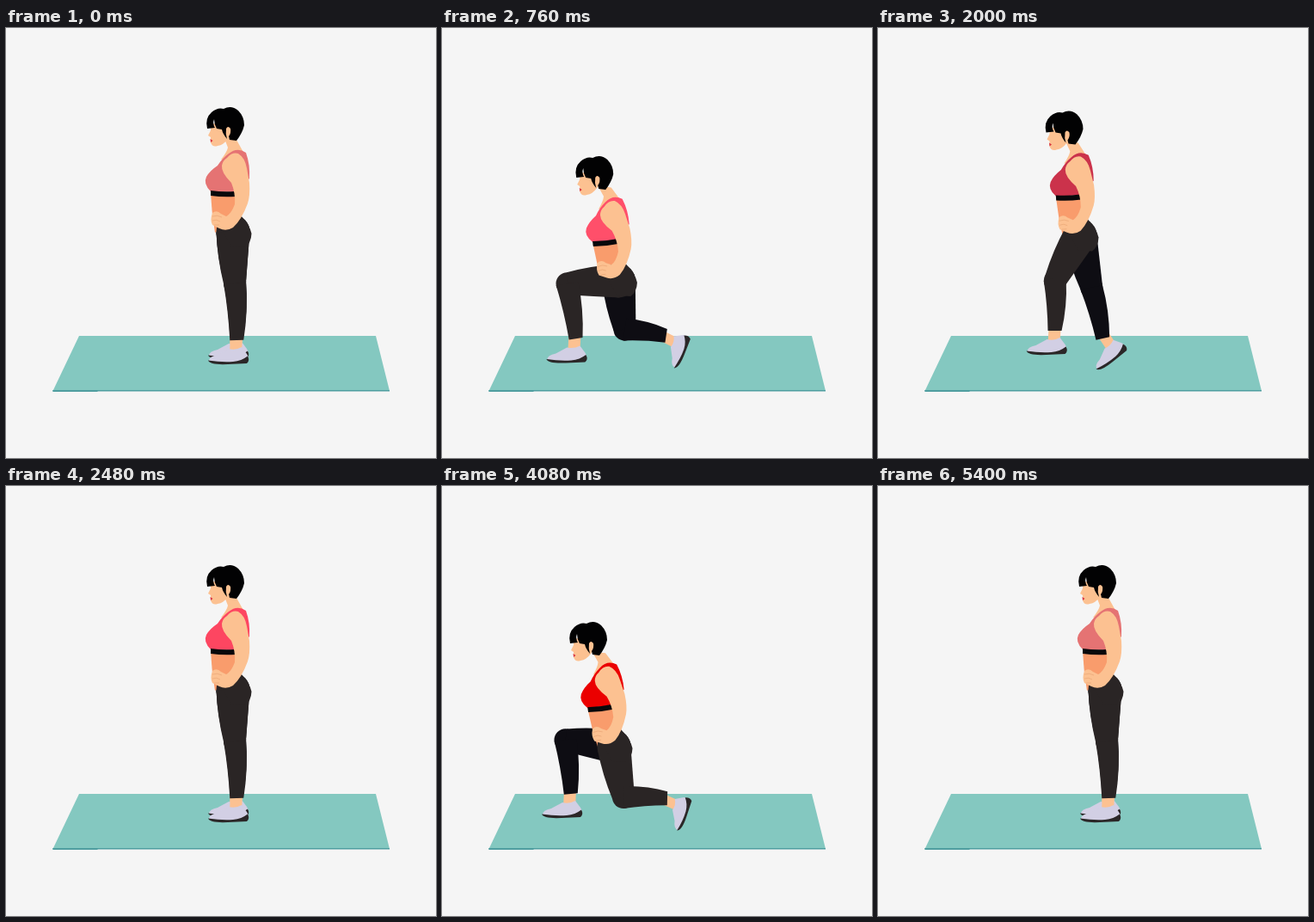
Recreate the animation shown at these times as an HTML page with a canvas. Size 500x500 px, loop 6.04 s.

```html
<!DOCTYPE html>
<html lang="en">
<head>
<meta charset="utf-8">
<title>Lunges</title>
<style>
html, body { margin: 0; width: 100%; height: 100%; overflow: hidden; background: #f5f5f5; }
canvas { display: block; width: 100vmin; height: 100vmin; }
</style>
</head>
<body>
<canvas id="stage" width="500" height="500"></canvas>
<script>
const ctx = document.getElementById('stage').getContext('2d');
const LOOP = 6040, SECOND_LUNGE = 2940;
const SKIN = '#fcc191', BELLY = '#f99c6c', NEAR = '#2a2525', FAR = '#0e0d13';

const shapes = {
  mat: 'M85 358H430L446 422H54.500Z',
  belly: 'M238 192L267 193L270 220L243 238Q239 215 238 192Z',
  neck: 'M253 126L258 139Q257 144 250 153L278 148L268 130Z',
  bra: 'M259 146Q269 138 279 145Q284 159 283 175L268 191L238 190Q229 181 233 173Q237 166 246 160Q251 152 259 146Z',
  band: 'M238 189Q252 191 266 190L267 196Q252 197 238 195Z',
  pelvis: 'M272 217Q283 228 285.500 239Q285 250 278 255L262 254L252 236Z',
  arm: 'M257 151Q263 144 270 146Q278 151 280 163L283 180Q284 195 281 204Q274 223 264 232Q256 237 248 233L240 229Q237 223 240 215Q245 211 250 216L256 219Q262 216 266 205Q267 192 262 180Q250 168 251 160Q252 154 257 151Z',
  fingers: 'M240 219Q246 217 251 220M240 224Q245 222 249 225M242 229L248 229',
  face: 'M238 112V119L235 125L238 127V133Q240 139 246 137Q253 136 258 129L263 122L258 108Z',
  lips: 'M237.500 129L240.500 131L238 133Z',
  hair: 'M234 117Q231 105 239 98Q246 92 253 94Q262 89 270 96Q277 103 277 113Q275 122 268 131L260 130L259 126Q262 122 261 117Q258 113 256 117Q255 123 257 129Q252 123 251 118L245 117Q242 112 242 106Q240 111 243 116Z',
  shoe: 'M-32 32Q-32 27 -22 25L-9 18Q-1 20 6 16L12 24Q15 28 12 31L-8 35Z',
  sole: 'M-33 31.500Q-17 34 -4 33Q6 32 13 26.500Q16 32 12 35L-10 36Q-31 37 -33 31.500Z'
};
for (const name in shapes) shapes[name] = new Path2D(shapes[name]);

// time in ms, then the colour of the top
const topColours = [
  [0, 229, 115, 115], [760, 255, 79, 106], [1560, 157, 31, 55], [2480, 253, 70, 97],
  [3240, 240, 47, 80], [4080, 235, 0, 0], [5400, 229, 115, 115], [LOOP, 229, 115, 115]
];

const mix = (a, b, k) => a + (b - a) * k;
const mixPoint = (a, b, k) => [mix(a[0], b[0], k), mix(a[1], b[1], k)];
function smooth(from, to, t) {
  const u = Math.min(1, Math.max(0, (t - from) / (to - from)));
  return u * u * (3 - 2 * u);
}

function fill(name, colour) {
  ctx.fillStyle = colour;
  ctx.fill(shapes[name]);
}

function topColour(t) {
  const i = topColours.findIndex(key => key[0] > t);
  const a = topColours[i - 1], b = topColours[i];
  const k = (t - a[0]) / (b[0] - a[0]);
  return `rgb(${[1, 2, 3].map(j => Math.round(mix(a[j], b[j], k)))})`;
}

// Tapered segment with bulging sides
function limb(a, b, ra, rb, front, back) {
  const angle = Math.atan2(b[1] - a[1], b[0] - a[0]);
  const length = Math.hypot(b[0] - a[0], b[1] - a[1]);
  const middle = (ra + rb) / 2;
  ctx.save();
  ctx.translate(...a);
  ctx.rotate(angle);
  ctx.beginPath();
  ctx.moveTo(0, ra);
  ctx.quadraticCurveTo(length / 2, middle + front, length, rb);
  ctx.lineTo(length, -rb);
  ctx.quadraticCurveTo(length / 2, -middle - back, 0, -ra);
  ctx.fill();
  ctx.restore();
}

function dot([x, y], r) {
  ctx.beginPath();
  ctx.arc(x, y, r, 0, 7);
  ctx.fill();
}

function bendKnee(hip, ankle, thigh, calf) {
  const dx = ankle[0] - hip[0], dy = ankle[1] - hip[1], d = Math.hypot(dx, dy);
  const along = (thigh * thigh - calf * calf + d * d) / (2 * d);
  const out = Math.sqrt(Math.max(0, thigh * thigh - along * along));
  return [hip[0] + (dx * along - dy * out) / d, hip[1] + (dy * along + dx * out) / d];
}

function drawFoot(ankle, turn, length) {
  ctx.save();
  ctx.translate(...ankle);
  ctx.rotate(turn);
  ctx.scale(length, 1);
  ctx.strokeStyle = SKIN;
  ctx.lineWidth = 14;
  ctx.beginPath();
  ctx.moveTo(0, 4);
  ctx.lineTo(-1, 23);
  ctx.stroke();
  fill('shoe', '#d2cfe4');
  fill('sole', '#2b2728');
  ctx.restore();
}

function drawLeg(hip, near, forward, step) {
  const stand = near ? [268, 355] : [268, 349];
  const end = forward ? (near ? [149, 355] : [149, 350]) : (near ? [254, 363] : [252, 357]);
  const ankle = mixPoint(stand, end, step);
  const swing = forward ? Math.sin(Math.PI * step) : 0;
  ankle[1] -= 11 * swing;
  const thigh = near ? 60 : 57;
  const calf = (near ? 58 : 55) - (forward ? 8 * swing : 15 * step);
  const knee = bendKnee(hip, ankle, thigh, calf);
  const reach = Math.hypot(ankle[0] - knee[0], ankle[1] - knee[1]);
  const cuff = mixPoint(knee, ankle, 1 + 8 / reach);

  drawFoot(ankle, forward ? 0 : -1.2 * step, forward ? 1 : 1 - 0.15 * step);
  ctx.fillStyle = near ? NEAR : FAR;
  dot(hip, 19.5);
  dot(knee, 13);
  limb(hip, knee, 19.5, 13, 3, 0);
  limb(knee, cuff, 13, 8, -2, 4);
}

function draw(t) {
  const second = t >= SECOND_LUNGE;
  const c = second ? t - SECOND_LUNGE : t;
  const step = smooth(80, 910, c) - smooth(1560, 2390, c);
  const footStep = smooth(20, 870, c) - smooth(1590, 2440, c);
  const drop = smooth(420, 865, c) - smooth(1600, 2060, c);
  const shift = [-64 * step, 62 * drop + 4 * step];
  const hip = [264 + shift[0], 237 + shift[1]];

  const inBody = paint => {
    ctx.save();
    ctx.translate(250 + shift[0], 222 + shift[1]);
    ctx.rotate(-0.15 * step);
    ctx.translate(-250, -222);
    paint();
    ctx.restore();
  };

  ctx.fillStyle = '#f5f5f5';
  ctx.fillRect(0, 0, 500, 500);
  fill('mat', '#84c8c0');
  ctx.fillStyle = '#4f9ea0';
  ctx.fillRect(54.5, 421, 391.5, 1.5);
  ctx.fillRect(54.5, 421, 52, 2);

  drawLeg(hip, false, second, footStep);
  inBody(() => {
    fill('belly', BELLY);
    fill('neck', SKIN);
    fill('bra', topColour(t));
    fill('band', '#08080b');
  });
  drawLeg(hip, true, !second, footStep);

  ctx.save();
  ctx.translate(...shift);
  fill('pelvis', NEAR);
  ctx.restore();

  inBody(() => {
    fill('arm', SKIN);
    ctx.strokeStyle = '#eaa777';
    ctx.lineWidth = 0.7;
    ctx.stroke(shapes.fingers);
  });

  // The head stays upright while the body leans
  ctx.save();
  ctx.translate(shift[0] - 21 * step, shift[1]);
  fill('face', SKIN);
  fill('lips', '#d8343f');
  fill('hair', '#020203');
  ctx.restore();
}

function tick() {
  draw(performance.now() % LOOP);
  requestAnimationFrame(tick);
}
tick();
</script>
</body>
</html>
```
